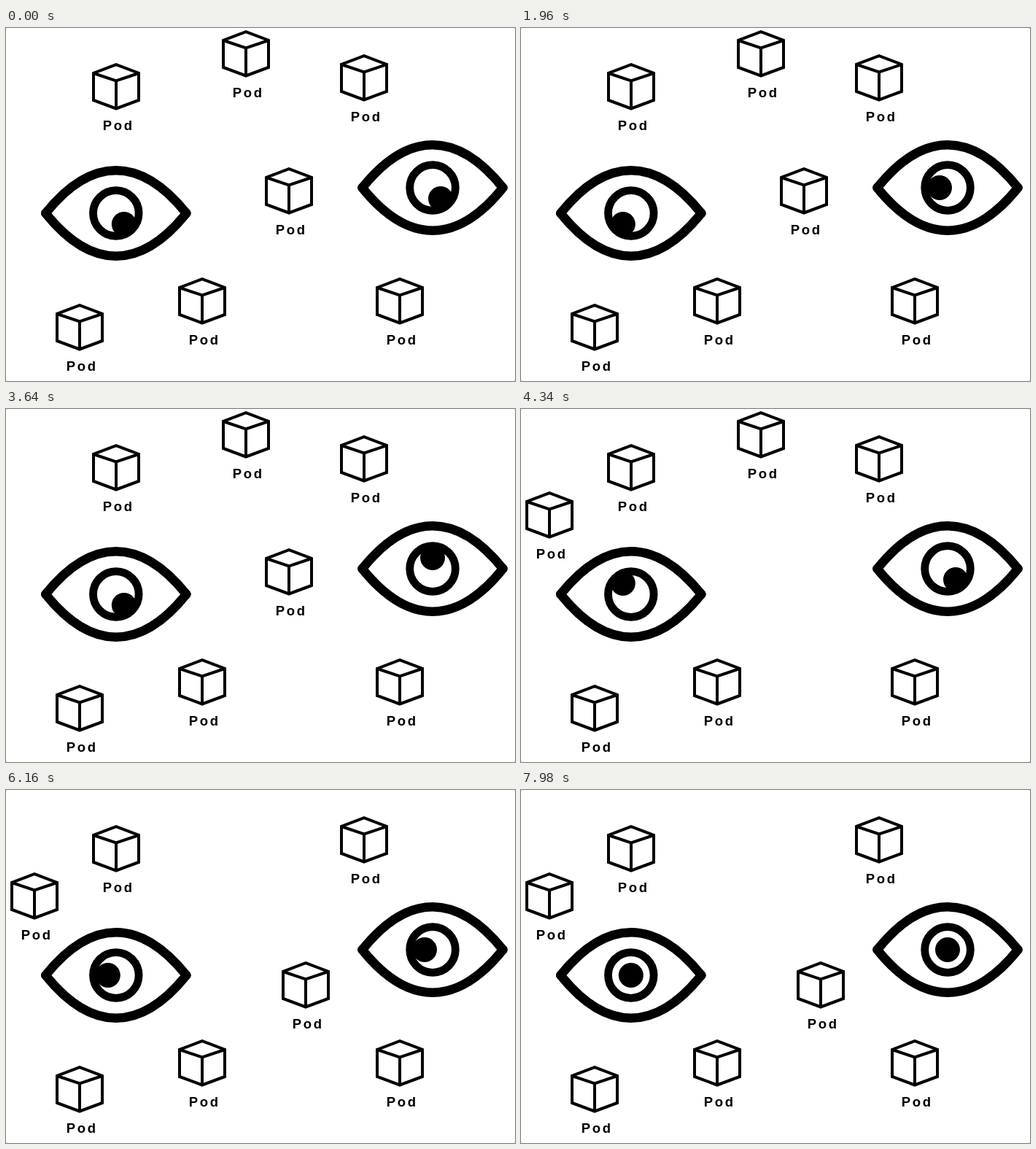
Write an HTML page that moves like this. It is 698 px wide and 484 px high and loops after 8120 ms.

```html
<!DOCTYPE html>
<html lang="en">
<head>
<meta charset="utf-8">
<title>Watching pods</title>
<style>
  html, body { margin: 0; width: 100%; height: 100%; overflow: hidden; background: #bbb; }
  svg { display: block; width: 698px; height: 484px; background: #fff; border-radius: 2px; }
  text { font: bold 18.5px "Liberation Sans", Arial, sans-serif; letter-spacing: 2.6px; }
  .line { fill: none; stroke: #000; }
</style>
</head>
<body>
<svg id="stage" viewBox="0 0 698 484">
  <defs>
    <clipPath id="iris"><circle r="28"/></clipPath>
    <g id="pod">
      <path class="line" stroke-width="4" d="M0 2.2 31 14V51L0 62.5-31 51V14ZM-31 14 0 24.5 31 14M0 24.5V62.5"/>
      <text x="-18.2" y="91.5">Pod</text>
    </g>
    <path id="lid" d="M-96.5 0C-72-30.5-39-58.7 0-58.7S72-30.5 96.5 0"/>
    <g id="eye" class="line">
      <g stroke-width="12.5" stroke-linecap="round">
        <use href="#lid"/>
        <use href="#lid" transform="scale(1 -1)"/>
      </g>
      <circle r="31.3" stroke-width="10.8"/>
    </g>
    <path id="bolt" fill="#e8592f" d="M-6 12H7L3 27 12 30-1 54 0 38-13 37Z"/>
  </defs>
</svg>
<script>
const LOOP = 8120;
const HOLD = 560;
const PAUSE = 140;
const MOVED = 4200, STRUCK = 5530, REPLACED = 6160;
const SVG = 'http://www.w3.org/2000/svg';
const stage = document.getElementById('stage');

function add(parent, tag, attributes) {
  const node = document.createElementNS(SVG, tag);
  for (const name in attributes) node.setAttribute(name, attributes[name]);
  return parent.appendChild(node);
}

const at = (x, y) => `translate(${x} ${y})`;
const actors = [];

function place(shape, x, y, from = 0, to = LOOP) {
  actors.push({ from, to, node: add(stage, 'use', { href: shape, transform: at(x, y) }) });
}

place('#pod', 151, 48);
place('#pod', 491, 36);
place('#pod', 269, 342);
place('#pod', 540, 342);
place('#pod', 101, 378);
place('#pod', 388, 191, 0, MOVED);
place('#pod', 39, 113, MOVED);
place('#pod', 329, 3, 0, REPLACED);
place('#bolt', 329, 3, STRUCK, REPLACED);
place('#pod', 411, 235, REPLACED);

function addEye(x, y) {
  const eye = add(stage, 'g', { transform: at(x, y) });
  const pupil = add(add(eye, 'g', { 'clip-path': 'url(#iris)' }), 'circle', { r: 17 });
  add(eye, 'use', { href: '#eye' });
  return pupil;
}

const pupils = [addEye(150.8, 254), addEye(585, 219)];

// Compass directions of the left and right eye; each + holds the look a little longer.
const looks = 'SE:SE++ S:N NW:NE SW:W NW:E SE:N+ E:S NW:SE+ S:W NE:NW W:W S:NE -:-++'
  .split(' ')
  .map(look => ({
    gazes: look.split(':'),
    hold: HOLD + PAUSE * (look.split('+').length - 1)
  }));

function lookAt(time) {
  return looks.find(({ hold }) => (time -= hold) < 0);
}

function turn(pupil, gaze) {
  const toward = (plus, minus) => gaze.includes(plus) - gaze.includes(minus);
  pupil.setAttribute('cx', 11 * toward('E', 'W'));
  pupil.setAttribute('cy', 15 * toward('S', 'N'));
}

function draw(now) {
  const time = now % LOOP;
  for (const { node, from, to } of actors) {
    node.style.display = time >= from && time < to ? '' : 'none';
  }
  const { gazes } = lookAt(time);
  pupils.forEach((pupil, i) => turn(pupil, gazes[i]));
}

const start = performance.now();
function tick() {
  draw(performance.now() - start);
  requestAnimationFrame(tick);
}
tick();
</script>
</body>
</html>
```
